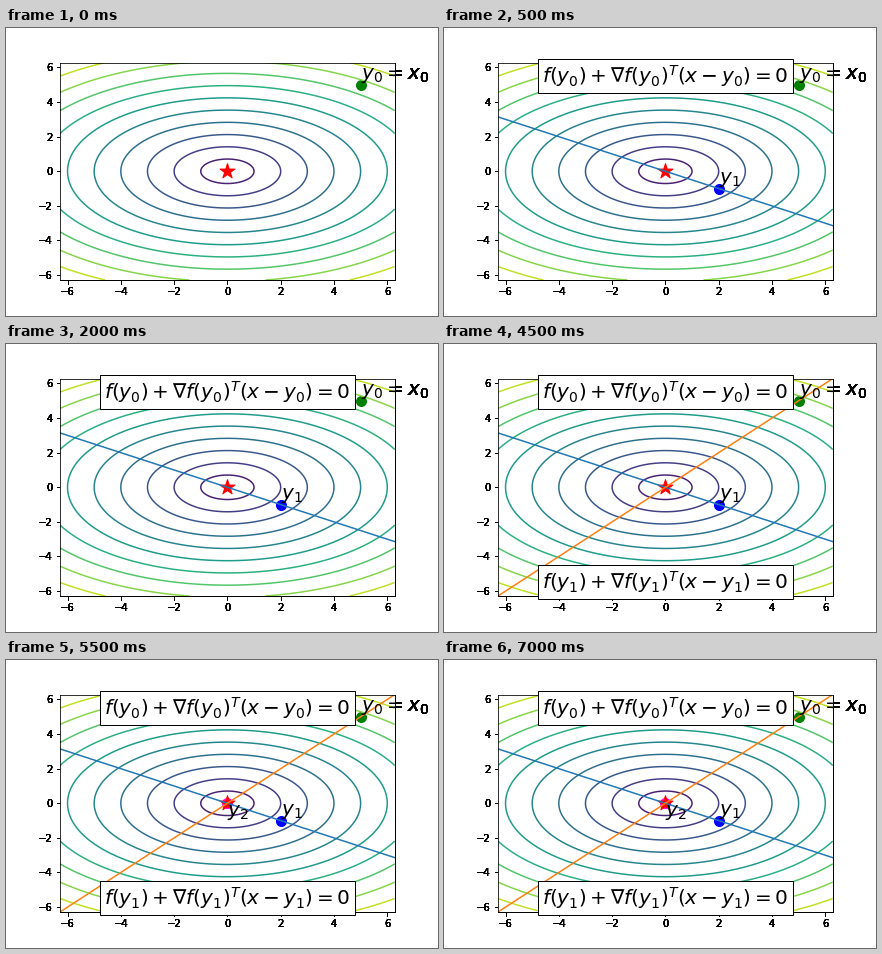
A matplotlib script that plays this animation: 432x288 px, repeating every 8000 ms.

```python
import numpy as np
import matplotlib.pyplot as plt
from matplotlib.animation import FuncAnimation

STEP_MS = 500
FRAMES = 16
STARTS = {"cut0": 1, "cut1": 6, "end": 11}   # first frame of each stage
LIM = 2 * np.pi
LAYERS = 8   # identical axes on top of each other darken the outer labels

fig = plt.figure(figsize=(6, 4), dpi=72, facecolor="white")
grid = np.linspace(-LIM, LIM, 201)
X, Y = np.meshgrid(grid, grid)
Z = np.sqrt(X**2 + 2 * Y**2)


def label(ax, x, y, text, va="bottom"):
    return ax.text(x, y, text, fontsize=20, va=va)


def base_axes():
    ax = fig.add_axes([0.125, 0.125, 0.775, 0.755])
    ax.contour(X, Y, Z, levels=np.arange(1, 11), vmin=0, vmax=11,
               cmap="viridis", linewidths=1.5)
    ax.scatter(0, 0, s=250, c="red", marker="*", zorder=1.5)
    ax.scatter(5, 5, s=100, c="green", zorder=1)
    label(ax, 5, 5, "$y_0 = x_0$")
    ax.set(xlim=(-LIM, LIM), ylim=(-LIM, LIM))
    return ax


def cut(ax, slope, color, y, k):
    """Cutting line through the minimum with its boxed equation."""
    line, = ax.plot(grid, slope * grid, color=color, lw=1.5)
    eq = rf"$f(y_{k}) + \nabla f(y_{k})^T(x - y_{k}) = 0$"
    box = ax.text(0, y, eq, fontsize=20, ha="center", va="center",
                  bbox=dict(facecolor="white", edgecolor="black"))
    return [line, box]


ax = [base_axes() for _ in range(LAYERS)][-1]
stages = {
    "cut0": cut(ax, -0.5, "C0", 5.5, 0) + [
        ax.scatter(2, -1, s=100, c="blue", zorder=1),
        label(ax, 2, -1, "$y_1$")],
    "cut1": cut(ax, 1, "C1", -5.5, 1),
    "end": [ax.scatter(0, 0, s=100, c="magenta", zorder=1),
            label(ax, 0, 0, "$y_2$", va="top")],
}


def update(i):
    for name, artists in stages.items():
        for artist in artists:
            artist.set_visible(i >= STARTS[name])
    return []


anim = FuncAnimation(fig, update, frames=FRAMES, interval=STEP_MS,
                     init_func=lambda: update(0), repeat=True, repeat_delay=0)
plt.show()
```
